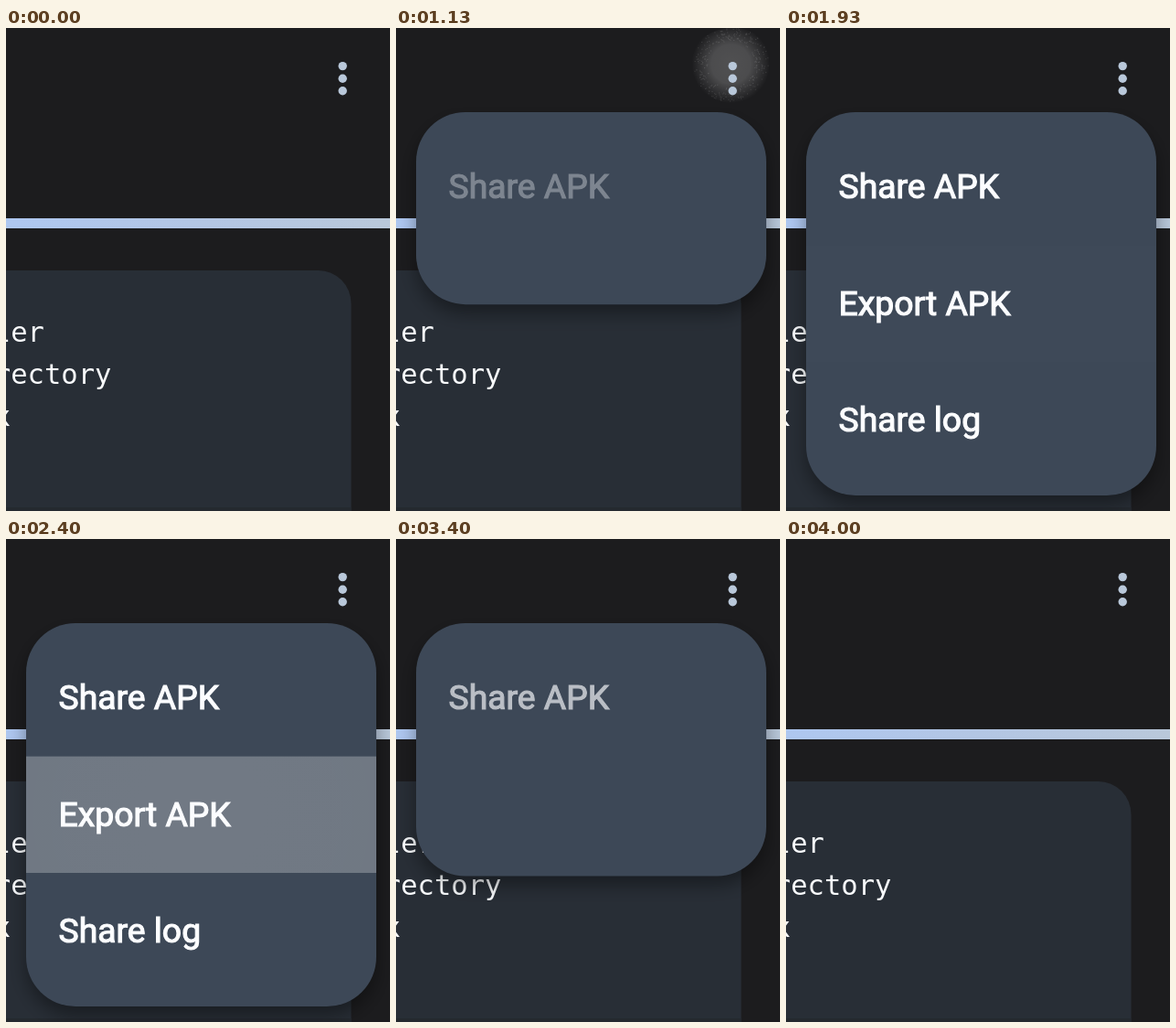
Write an HTML page that moves like this. It is 420x528 px and loops after 4070 ms.

```html
<!DOCTYPE html>
<html lang="en">
<head>
<meta charset="utf-8">
<title>Overflow menu</title>
<style>
  html, body { margin: 0; width: 100%; height: 100%; overflow: hidden; background: #1c1c1e; }
  svg { display: block; width: 420px; height: 528px; }
  .code { font: 30.5px "DejaVu Sans Mono", monospace; fill: #f8fafc; white-space: pre; }
  .item { font: 400 37.3px Roboto, sans-serif; fill: #fcfdff; stroke: #fcfdff; stroke-width: 1.2px; }
</style>
</head>
<body>
<svg viewBox="0 0 420 528" xmlns="http://www.w3.org/2000/svg">
  <defs>
    <linearGradient id="barFill">
      <stop offset="0" stop-color="#aec7f0"/>
      <stop offset=".5" stop-color="#b3c6e4"/>
      <stop offset="1" stop-color="#b9c8da"/>
    </linearGradient>
    <radialGradient id="glow">
      <stop offset="0" stop-color="#fff"/>
      <stop offset=".5" stop-color="#fff" stop-opacity=".92"/>
      <stop offset=".78" stop-color="#fff" stop-opacity=".4"/>
      <stop offset="1" stop-color="#fff" stop-opacity="0"/>
    </radialGradient>
    <filter id="blur" x="-20%" y="-20%" width="140%" height="150%">
      <feGaussianBlur stdDeviation="10"/>
    </filter>
    <clipPath id="iconClip"><circle cx="368" cy="55" r="55"/></clipPath>
    <clipPath id="rowClip"><rect x="22" y="237.5" width="383" height="127.5"/></clipPath>
  </defs>

  <rect width="420" height="528" fill="#1c1c1e"/>
  <rect y="208" width="420" height="11" fill="url(#barFill)"/>
  <rect x="-60" y="265" width="437.5" height="320" rx="36" fill="#282e36"/>
  <rect y="524" width="377.5" height="4" fill="#24292f"/>
  <g class="code">
    <text x="-13.2" y="342.5">ler</text>
    <text x="-13.2" y="388.5">rectory</text>
    <text x="-13.2" y="434.5">x</text>
  </g>

  <g id="iconInk" clip-path="url(#iconClip)"></g>
  <g fill="#b9c8da">
    <circle cx="368.2" cy="41.6" r="4.7"/>
    <circle cx="368.2" cy="55.2" r="4.7"/>
    <circle cx="368.2" cy="68.8" r="4.7"/>
  </g>

  <g id="menu">
    <rect id="shadow" fill="#000" fill-opacity=".38" filter="url(#blur)"/>
    <rect id="panel" fill="#3d4857"/>
    <g clip-path="url(#rowClip)">
      <rect id="press" x="22" y="237.5" width="383" height="127.5" fill="#fff"/>
      <g id="rowInk"></g>
    </g>
    <text class="item" x="57.5" y="185.7">Share APK</text>
    <text class="item" x="57.5" y="313.5">Export APK</text>
    <text class="item" x="57.5" y="441">Share log</text>
  </g>
</svg>
<script>
const LOOP = 4070, STEP = 1000 / 15;
const OPEN = 1033, CLOSE = 3188, MENU_MS = 300, INK_MS = 617;
const PRESS = 1928, RELEASE = 2640;
const BOX = { right: 405, top: 92, w: 383, h: 419, r: 54 };
const UNIT = 1 / 4.5;

const $ = id => document.getElementById(id);
const set = (el, attrs) => { for (const k in attrs) el.setAttribute(k, attrs[k]); };
const add = (parent, tag, attrs) => {
  const el = document.createElementNS("http://www.w3.org/2000/svg", tag);
  set(el, attrs);
  return parent.appendChild(el);
};
const span = (x, a, b) => Math.min(1, Math.max(0, (x - a) / (b - a)));
const lerp = (a, b, k) => a + (b - a) * k;

// cubic-bezier(.4, 0, .2, 1)
function ease(x) {
  let lo = 0, hi = 1;
  for (let i = 0; i < 20; i++) {
    const s = (lo + hi) / 2, q = 1 - s;
    if (1.2 * s * q * q + .6 * s * s * q + s * s * s < x) lo = s; else hi = s;
  }
  return lo * lo * (3 - 2 * lo);
}

function random(seed) {
  return () => (seed = (seed * 16807) % 2147483647) / 2147483647;
}

// Soft growing ripple with a grainy rim
function makeInk(id, o) {
  const circle = add($(id), "circle", { fill: "url(#glow)" });
  const grain = add($(id), "path", { fill: "#fff" });
  return t => {
    const p = (t - o.start) / INK_MS;
    const on = p > 0 && p < 1;
    $(id).style.display = on ? "" : "none";
    if (!on) return;
    const k = ease(span(p, 0, .75)), r = Math.max(1, o.radius * k);
    const cx = lerp(o.from[0], o.to[0], k), cy = lerp(o.from[1], o.to[1], k);
    const fadeIn = span(p, 0, .13);
    set(circle, { cx, cy, r: r * o.spread, opacity: o.alpha * fadeIn * (1 - span(p, .4, 1)) });
    const rnd = random(7 + Math.round(p * 1000));
    let d = "";
    for (let i = 0; i < o.grains; i++) {
      const a = rnd() * Math.PI * 2, m = r * (.6 + .36 * rnd());
      d += `M${(cx + m * Math.cos(a)).toFixed(1)} ${(cy + m * Math.sin(a)).toFixed(1)}h1v1h-1z`;
    }
    set(grain, { d, opacity: o.grainAlpha * fadeIn * (1 - span(p, .4, .75)) });
  };
}

const iconInk = makeInk("iconInk", {
  start: 985, from: [365, 28], to: [368, 55],
  radius: 101, spread: 1, alpha: .23, grains: 300, grainAlpha: .12
});
const rowInk = makeInk("rowInk", {
  start: PRESS, from: [215, 301], to: [213.5, 301],
  radius: 215, spread: 2, alpha: .25, grains: 300, grainAlpha: .1
});
const items = [...document.querySelectorAll(".item")];

function menuProgress(t) {
  if (t < CLOSE) return span(t, OPEN, OPEN + MENU_MS);
  return span(1 - span(t, CLOSE, CLOSE + MENU_MS), 0, 2 / 3);
}

function drawMenu(t) {
  const p = menuProgress(t);
  $("menu").style.display = p > 0 ? "" : "none";
  if (!p) return;
  const width = BOX.w * span(p, 0, UNIT), height = BOX.h * span(p, 0, 3 * UNIT);
  const rect = {
    x: BOX.right - width, y: BOX.top, width, height,
    rx: Math.min(BOX.r, width / 2, height / 2)
  };
  set($("panel"), rect);
  set($("shadow"), { ...rect, y: BOX.top + 10 });
  set($("menu"), { opacity: span(p, 0, 1 / 3) });
  items.forEach((el, i) => {
    const a = UNIT * (i + 1);
    set(el, { opacity: span(p, a, a + 1.5 * UNIT) });
  });
  set($("press"), { opacity: .19 * span(t, PRESS, PRESS + 200) * (1 - span(t, RELEASE, RELEASE + 200)) });
}

function draw(ms) {
  const t = Math.floor((ms % LOOP + 4) / STEP) * STEP;
  iconInk(t);
  drawMenu(t);
  rowInk(t);
}

const begin = performance.now();
function tick() {
  draw(performance.now() - begin);
  requestAnimationFrame(tick);
}
tick();
</script>
</body>
</html>
```
